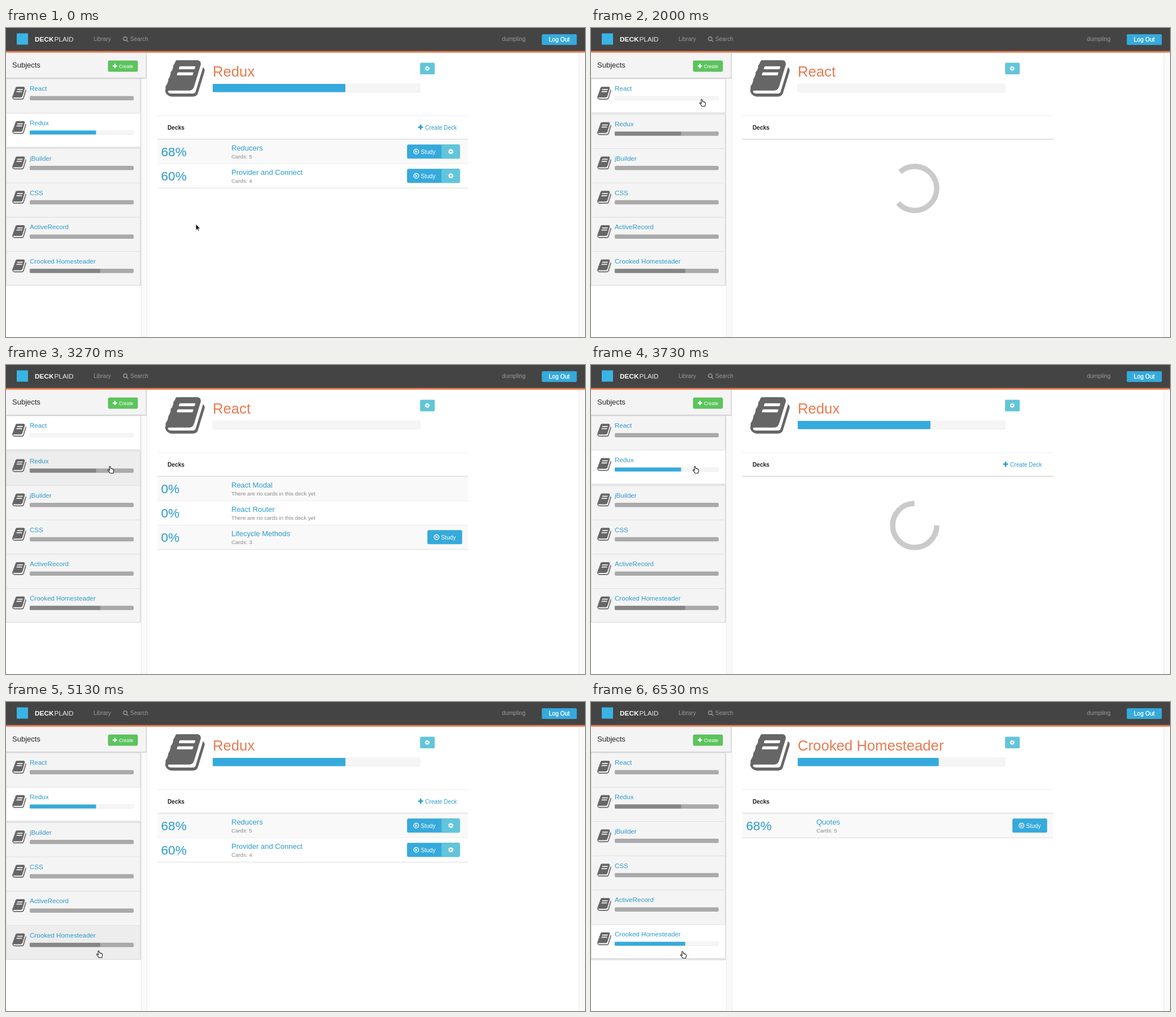
An HTML page that plays this animation: 1025x547 px, repeating every 6.59 s.

```html
<!DOCTYPE html>
<html lang="en">
<head>
<meta charset="utf-8">
<title>Flash card decks</title>
<style>
html, body { margin: 0; width: 100%; height: 100%; overflow: hidden; background: #fff; }
svg { display: block; width: 100%; height: 100%; }
text { font-family: "Liberation Sans", Arial, Helvetica, sans-serif; white-space: pre; }
</style>
</head>
<body>
<svg viewBox="0 0 1025 547">
  <defs>
    <path id="book" fill="#666" fill-rule="evenodd" d="M1703 478q40 57 18 129l-275 906q-40 135-199 151H324Q140 1640 76 1479Q55 1400 74 1352L82 1290 75 1247Q170 1110 191 996V938Q270 830 292 705L290 645Q385 530 404 411L399 359Q435 320 475 231Q520 100 620 134L670 128h761q140 16 132 186l-274 906q-50 180-200 188H220q-50 5-39 58 24 70 144 70h923q75-10 91-57l300-987q7-22 5-57 40 15 59 43zM639 480q-2 32 22 32h608q32 0 42-32l21-64q4-32-22-32H702q-32 0-42 32zM556 736q-2 32 22 32h608q32 0 42-32l21-64q4-32-22-32H619q-32 0-42 32z"/>
    <g id="gear" fill="none" stroke="#fff">
      <circle r="2.6" stroke-width="2"/>
      <circle r="4" stroke-width="1.5" stroke-dasharray="1.57 1.57"/>
    </g>
    <path id="plus" d="M-1.2-4h2.4v2.8h2.8v2.4h-2.8v2.8h-2.4v-2.8h-2.8v-2.4h2.8z"/>
    <g id="play">
      <circle r="4.3" fill="none" stroke="#fff" stroke-width="1.3"/>
      <path d="M-1.5-2.5L2.6 0-1.5 2.5z" fill="#fff"/>
    </g>
  </defs>
  <g id="page"></g>
  <path id="spinner" d="M27.6 27.6A39 39 0 1 0-27.6 27.6" transform="translate(573 284)" fill="none" stroke="#cacaca" stroke-width="9.5"/>
  <path id="arrow" d="M0 0v11.2l2.6-2.4 1.6 3.6 1.8-.8-1.6-3.5h3.5z" fill="#111" stroke="#fff" stroke-width=".8"/>
  <path id="hand" d="M-1.2.2q1-1 2 0l.9 3.3q1-.6 1.6.3 1.2-.4 1.6.5 1.3-.2 1.5 1l.2 2.5-.9 3.7H.2L-2 8-3.6 6q.2-1.2 1.5-.6l1.5 1.2z" fill="#fff" stroke="#222" stroke-width="1.1"/>
</svg>
<script>
const LOOP = 6590, BLUE = '#35aadc', LINK = '#2b9bcd', ORANGE = '#e67b50', TEAL = '#62c5da';
const $ = id => document.getElementById(id);

const subjects = [
  { name: 'React', progress: 0, decks: [['React Modal', 0, 0], ['React Router', 0, 0], ['Lifecycle Methods', 0, 3]] },
  { name: 'Redux', progress: .64, owned: true, decks: [['Reducers', 68, 5], ['Provider and Connect', 60, 4]] },
  { name: 'jBuilder', progress: 0 },
  { name: 'CSS', progress: 0 },
  { name: 'ActiveRecord', progress: 0 },
  { name: 'Crooked Homesteader', progress: .68, decks: [['Quotes', 68, 5]] }
];

// start time, selected subject, loading
const scenes = [[0, 1, 0], [1990, 0, 1], [2600, 0, 0], [3320, 1, 1], [4080, 1, 0], [5270, 5, 1], [5940, 5, 0]];

// time, x, y of the pointer's hot spot
const moves = [
  [0, 336, 347], [330, 336, 347], [1130, 245, 195], [1600, 196, 127], [2200, 196, 127],
  [2600, 195, 140], [2800, 195, 140], [3150, 184, 180], [4200, 184, 180],
  [4900, 165, 441], [5130, 164, 441], [5260, 162, 442]
];

const rect = (x, y, w, h, fill, r = 0, extra = '') =>
  `<rect x="${x}" y="${y}" width="${w}" height="${h}" rx="${r}" fill="${fill}" ${extra}/>`;
const text = (x, y, size, fill, str, extra = '') =>
  `<text x="${x}" y="${y}" font-size="${size}" fill="${fill}" ${extra}>${str}</text>`;
const use = (id, x, y, scale = 1, extra = '') =>
  `<use href="#${id}" transform="translate(${x} ${y}) scale(${scale})" ${extra}/>`;
const bold = 'font-weight="700"';

const itemTop = (i, sel) => 89.5 + 60.75 * i + (i > sel ? 2 : 0);

function topBar() {
  return rect(0, 0, 1025, 41, '#444') + rect(0, 40.7, 1025, 3, ORANGE)
    + rect(19, 9.5, 20, 20, '#39b4e4')
    + text(51, 24, 11.8, '#fff', 'DECK', bold) + text(85.5, 24, 11.8, '#eee', 'PLAID')
    + text(155, 23.2, 10.1, '#999', 'Library') + text(220, 23.2, 10.1, '#999', 'Search')
    + '<path d="M213.5 21.5l3 3M214.3 19a3.2 3.2 0 1 1-6.4 0a3.2 3.2 0 1 1 6.4 0" fill="none" stroke="#999" stroke-width="1.4"/>'
    + text(878, 23.2, 10.3, '#999', 'dumpling')
    + rect(948.5, 11, 62, 19, BLUE, 2) + text(961, 23.8, 10.4, '#fff', 'Log Out', 'stroke="#fff" stroke-width=".3"');
}

function sidebar(sel, hover) {
  const items = subjects.map((s, i) => {
    const y = itemTop(i, sel), on = i === sel;
    return rect(0, y, 239, 60.75, '#dedede')
      + rect(1, y + 1, 236, on ? 59.75 : 60, on ? '#fff' : i === hover ? '#ededed' : '#f4f4f4')
      + (on ? rect(0, y + 59.7, 239, 3, '#e5e5e5') + rect(237, y + 1, 2, 60, '#e8e8e8') : '')
      + use('book', 10.2, y + 12.7, .0148)
      + text(42, y + 21.8, 11.6, LINK, s.name)
      + rect(42.5, y + 31.5, 183, 6.5, on ? '#f5f5f5' : '#aaa', 1.5, `stroke="${on ? '#ececec' : '#9c9c9c'}" stroke-width=".8"`)
      + rect(42, y + 31.2, 183.5 * s.progress, 7, on ? BLUE : '#858585', 1);
  });
  return rect(239, 89, 10.5, 458, '#fafafa') + rect(239, 89, 1, 458, '#e8e8e8') + rect(249, 89, 1, 458, '#ececec')
    + items.join('') + rect(0, itemTop(6, sel) - (sel === 5 ? 0 : 1), 239, 1, '#d8d8d8')
    + rect(0, 44, 249, 45.5, '#ccc') + rect(0, 44, 247.7, 44, '#f4f4f4')
    + text(11, 70, 13, '#222', 'Subjects')
    + rect(181, 58, 52, 19, '#5cc45c', 2, 'stroke="#4eb04e" stroke-width=".7"')
    + use('plus', 192.8, 67.3, .95, 'fill="#fff"') + text(200, 70.7, 8.4, '#fff', 'Create');
}

function deckRow([name, percent, cards], i, owned) {
  const y = 197.5 + 43 * i, x = owned ? 710 : 746;
  let row = rect(268, y, 550, 43, i % 2 ? '#fff' : '#f9f9f9') + rect(268, y + 42.5, 550, 1, '#ddd')
    + text(274.5, y + 29.5, 22.6, LINK, percent + '%')
    + text(399, y + 19.5, 13, LINK, name)
    + text(399, y + 33, 9.7, '#888', cards ? 'Cards: ' + cards : 'There are no cards in this deck yet');
  if (cards) {
    row += rect(x, y + 8.7, owned ? 93.5 : 61.5, 25, BLUE, 2.5)
      + use('play', x + 16.2, y + 21.3) + text(x + 24.3, y + 25, 10.2, '#fff', 'Study');
    if (owned) row += `<path d="M771 ${y + 8.7}h30q2.5 0 2.5 2.5v20q0 2.5-2.5 2.5h-30z" fill="${TEAL}"/>` + use('gear', 787.5, y + 21.2);
  }
  return row;
}

function main(sel, loading) {
  const s = subjects[sel];
  return rect(1014, 44, 11, 503, '#fafafa') + rect(1014, 44, 1, 503, '#e8e8e8')
    + use('book', 279.2, 51.5, .042)
    + text(366, 86, 25.7, ORANGE, s.name)
    + rect(366, 99, 367, 14.5, '#f5f5f5', 2, 'stroke="#ebebeb" stroke-width=".8"')
    + rect(366, 99, 367 * s.progress, 14.5, BLUE, 1.5)
    + rect(733, 61.5, 26, 20.5, TEAL, 2) + use('gear', 745.7, 71.7, .9)
    + rect(268, 154.5, 550, 1, '#eee') + rect(268, 196.3, 550, 1.5, '#d4d4d4')
    + text(286, 180, 10.2, '#222', 'Decks', bold)
    + (s.owned ? use('plus', 734, 175.5, 1.1, `fill="${LINK}"`) + text(742, 180, 10.1, LINK, 'Create Deck') : '')
    + (loading ? '' : s.decks.map((d, i) => deckRow(d, i, s.owned)).join(''));
}

function pointer(t) {
  const k = moves.findIndex(m => m[0] > t);
  if (k < 0) return moves[moves.length - 1].slice(1);
  const [t0, x0, y0] = moves[k - 1], [t1, x1, y1] = moves[k];
  const u = (t - t0) / (t1 - t0), e = u * u * (3 - 2 * u);
  return [x0 + (x1 - x0) * e, y0 + (y1 - y0) * e];
}

let shown;
const begin = performance.now();

function frame() {
  const t = Math.max(0, performance.now() - begin) % LOOP;
  const [start, sel, loading] = scenes.filter(s => s[0] <= t).pop();
  const [x, y] = pointer(t);
  const hover = x < 237 ? subjects.findIndex((s, i) => y >= itemTop(i, sel) && y < itemTop(i + 1, sel)) : -1;

  const key = [start, hover].join();
  if (key !== shown) {
    shown = key;
    $('page').innerHTML = main(sel, loading) + sidebar(sel, hover) + topBar();
  }

  // the gap begins on the left and turns once in 1.1 s
  $('spinner').style.display = loading ? '' : 'none';
  $('spinner').setAttribute('transform', `translate(573 284) rotate(${90 + (t - start) / 1100 * 360})`);

  for (const [id, on] of [['arrow', hover < 0], ['hand', hover >= 0]]) {
    $(id).style.display = on ? '' : 'none';
    $(id).setAttribute('transform', `translate(${x} ${y})`);
  }
  requestAnimationFrame(frame);
}
frame();
</script>
</body>
</html>
```
